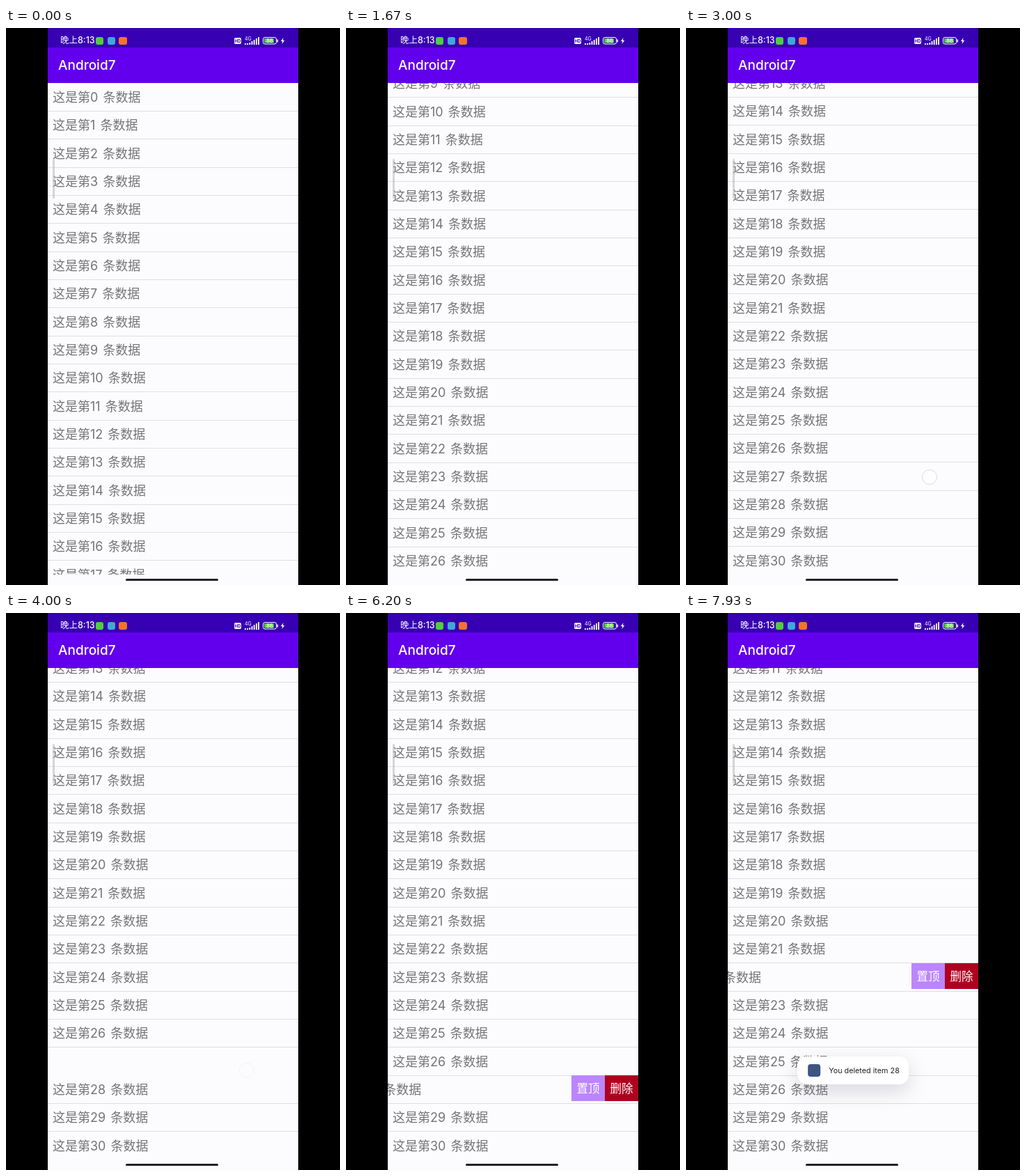
An HTML page that plays this animation: 480x800 px, repeating every 8000 ms.

```html
<!DOCTYPE html>
<html lang="zh-CN">
<head>
<meta charset="utf-8">
<title>Swipe list</title>
<style>
html, body { margin: 0; width: 100%; height: 100%; overflow: hidden; background: #000; }
body { font-family: Inter, "Noto Sans CJK SC", "Noto Sans CJK", sans-serif; }
div, svg, span { position: absolute; box-sizing: border-box; white-space: nowrap; }
#stage { left: 0; top: 0; width: 480px; height: 800px; overflow: hidden; background: #000; }
#phone { left: 60px; top: 0; width: 360px; height: 800px; overflow: hidden; background: #fcfcfe; }
#status { width: 360px; height: 28px; background: #3700b3; color: #fff; }
#clock { left: 18px; top: 9px; font-size: 12.5px; line-height: 18px; font-weight: 500; }
#status svg { left: 0; top: 0; }
#bar { top: 28px; width: 360px; height: 51px; background: #6200ee; color: #fff;
  font-size: 19px; font-weight: 500; line-height: 52px; padding-left: 15px; }
#list { top: 79px; width: 360px; height: 706px; overflow: hidden; }
.row { left: 0; top: 0; width: 360px; height: 41px; overflow: hidden; }
.line { top: 40px; width: 360px; height: 1px; background: #dedee4; }
.slide { left: 0; top: 0; width: 456px; height: 40px; }
.label { left: 7px; top: 0; font-size: 18px; line-height: 41px; word-spacing: 2px; color: #747478; }
.btn { top: 0; width: 48px; height: 37px; color: #fff; font-size: 16.5px; line-height: 38px; text-align: center; }
.pin { left: 360px; background: #bb86fc; }
.del { left: 408px; background: #b00020; }
#handle { left: 7px; top: 188px; width: 3px; height: 57px; border-radius: 2px; background: rgba(175,175,180,.5); }
#home { left: 112px; top: 791px; width: 133px; height: 3px; border-radius: 2px; background: #222226; }
#touch { left: -11px; top: -11px; width: 22px; height: 22px; border-radius: 50%;
  border: 1.5px solid #dcdce0; background: rgba(255,255,255,.5); }
.toast { left: 180px; top: 637px; height: 40px; transform: translateX(-50%); padding: 0 13px 0 45px;
  border-radius: 14px; background: #fff; color: #202024; font-size: 10.8px; line-height: 41px;
  box-shadow: 0 10px 28px rgba(90,90,110,.22); }
.toast i { position: absolute; left: 15px; top: 11px; width: 18px; height: 18px; border-radius: 4px; background: #3d5580; }
</style>
</head>
<body>
<div id="stage">
  <div id="phone">
    <div id="list"></div>
    <div id="handle"></div>
    <div id="status">
      <span id="clock">晚上8:13</span>
      <svg width="360" height="28" fill="#fff">
        <rect x="69" y="13" width="11" height="11" rx="3" fill="#4fcf3c"/>
        <rect x="86" y="13" width="11" height="11" rx="3" fill="#3fa8d8"/>
        <rect x="102" y="13" width="12" height="11" rx="3" fill="#f8722c"/>
        <rect x="268" y="14" width="10" height="9" rx="2"/>
        <text x="273" y="21" font-size="6" font-weight="700" text-anchor="middle" fill="#3700b3">HD</text>
        <text x="283" y="17.5" font-size="7">4G</text>
        <g id="signal"></g>
        <rect x="309.5" y="13.5" width="19" height="9.5" rx="2.5" fill="none" stroke="#fff"/>
        <rect x="311" y="15" width="14" height="6.5" rx="1" fill="#4fcf3c"/>
        <rect x="329.5" y="16.5" width="1.5" height="4"/>
        <text x="319" y="21" font-size="7.5" font-weight="600" text-anchor="middle">86</text>
        <path d="M338.5 14l-3.5 5h2.3l-.8 4 3.8-5.2h-2.4z"/>
      </svg>
    </div>
    <div id="bar">Android7</div>
    <div id="home"></div>
    <div id="touch"></div>
  </div>
</div>
<script>
const LOOP = 8000, TICK = 1000 / 15;
const PITCH = 121 / 3, VIEW = 706, COUNT = 31, OPEN = 96;
const FLING = 391, END = COUNT * PITCH - VIEW;
const $ = id => document.getElementById(id);

// Progress 0..1 of t between two times
const span = (t, from, to) => Math.min(1, Math.max(0, (t - from) / (to - from)));
const smooth = x => x * x * (3 - 2 * x);

const swipes = [
  { row: 27, at: 3000, y: 645 },
  { row: 28, at: 5100, y: 685 },
  { row: 22, at: 7540, y: 526 }
];
// Tapping a button removes the row, closes the gap, then shows a toast.
const taps = [
  { row: 27, at: 3800, x: 286, y: 657, text: "You top body item 27" },
  { row: 28, at: 6267, x: 336, y: 686, text: "You deleted item 28" }
];
const touches = [
  { at: 1000, hold: 350, x: 92, y: 630, dx: -19, dy: -209 },
  { at: 1867, hold: 200, x: 100, y: 600, dx: -16, dy: -190 },
  ...swipes.map(({ at, y }) => ({ at, y, hold: 270, x: 290, dx: -OPEN, dy: 0 })),
  ...taps.map(({ at, x, y }) => ({ at, x, y, hold: 135, dx: 0, dy: 0 }))
];

function scrollTop(t) {
  const fling = smooth(1 - (1 - span(t, 933, 1800)) ** 1.3);
  return FLING * fling + (END - FLING) * smooth(span(t, 1800, 2100));
}
// Overscroll stretches the list from its bottom edge and springs back.
const stretch = t => 1 + .0128 * Math.sin(Math.PI * Math.sqrt(span(t, 2067, 2530)));

function add(parent, className, html) {
  const el = document.createElement("div");
  el.className = className;
  el.innerHTML = html;
  parent.append(el);
  return el;
}

const buttons = '<div class="btn pin">置顶</div><div class="btn del">删除</div>';
const rows = Array.from({ length: COUNT }, (_, i) => add($("list"), "row",
  `<div class="slide"><span class="label">这是第${i} 条数据</span>${buttons}</div><div class="line"></div>`));
for (const tap of taps) {
  tap.toast = add($("phone"), "toast", "<i></i>" + tap.text);
}
$("phone").append($("touch"));

// Seven bars, growing to the right
for (let i = 0; i < 7; i++) {
  const h = Math.max(2, 2 * i - 1);
  $("signal").innerHTML += `<rect x="${283 + 3.2 * i}" y="${24 - h}" width="1.8" height="${h}"/>`;
}

function drawRows(t) {
  const top = scrollTop(t), pull = stretch(t);
  const shift = taps.reduce((sum, { at }) => sum + smooth(span(t, at + 200, at + 467)), 0);
  rows.forEach((row, i) => {
    const slot = i + (i < 27 ? shift : 0);
    const y = VIEW - (VIEW - (slot * PITCH - top)) * pull;
    row.style.transform = `translateY(${Math.round(y)}px)`;
  });
  for (const { row, at } of swipes) {
    const x = -Math.round(OPEN * smooth(span(t, at, at + 390)));
    rows[row].firstChild.style.transform = `translateX(${x}px)`;
  }
}

function drawTaps(t) {
  for (const { row, at, toast } of taps) {
    rows[row].style.opacity = 1 - span(t, at + 67, at + 200);
    toast.style.opacity = span(t, at + 267, at + 467) - span(t, at + 2200, at + 2400);
  }
}

function drawTouch(t) {
  const hit = touches.find(({ at, hold }) => t >= at && t < at + hold + 90);
  $("touch").style.opacity = hit ? 1 - span(t, hit.at + hit.hold, hit.at + hit.hold + 90) : 0;
  if (!hit) return;
  const p = span(t, hit.at, hit.at + hit.hold);
  $("touch").style.transform = `translate(${hit.x + hit.dx * p}px, ${hit.y + hit.dy * p}px)`;
}

function draw(time) {
  const t = Math.floor((time + 4) / TICK) * TICK;
  drawRows(t);
  drawTaps(t);
  drawTouch(t);
}

const start = performance.now();
function loop() {
  draw((performance.now() - start) % LOOP);
  requestAnimationFrame(loop);
}
loop();
</script>
</body>
</html>
```
